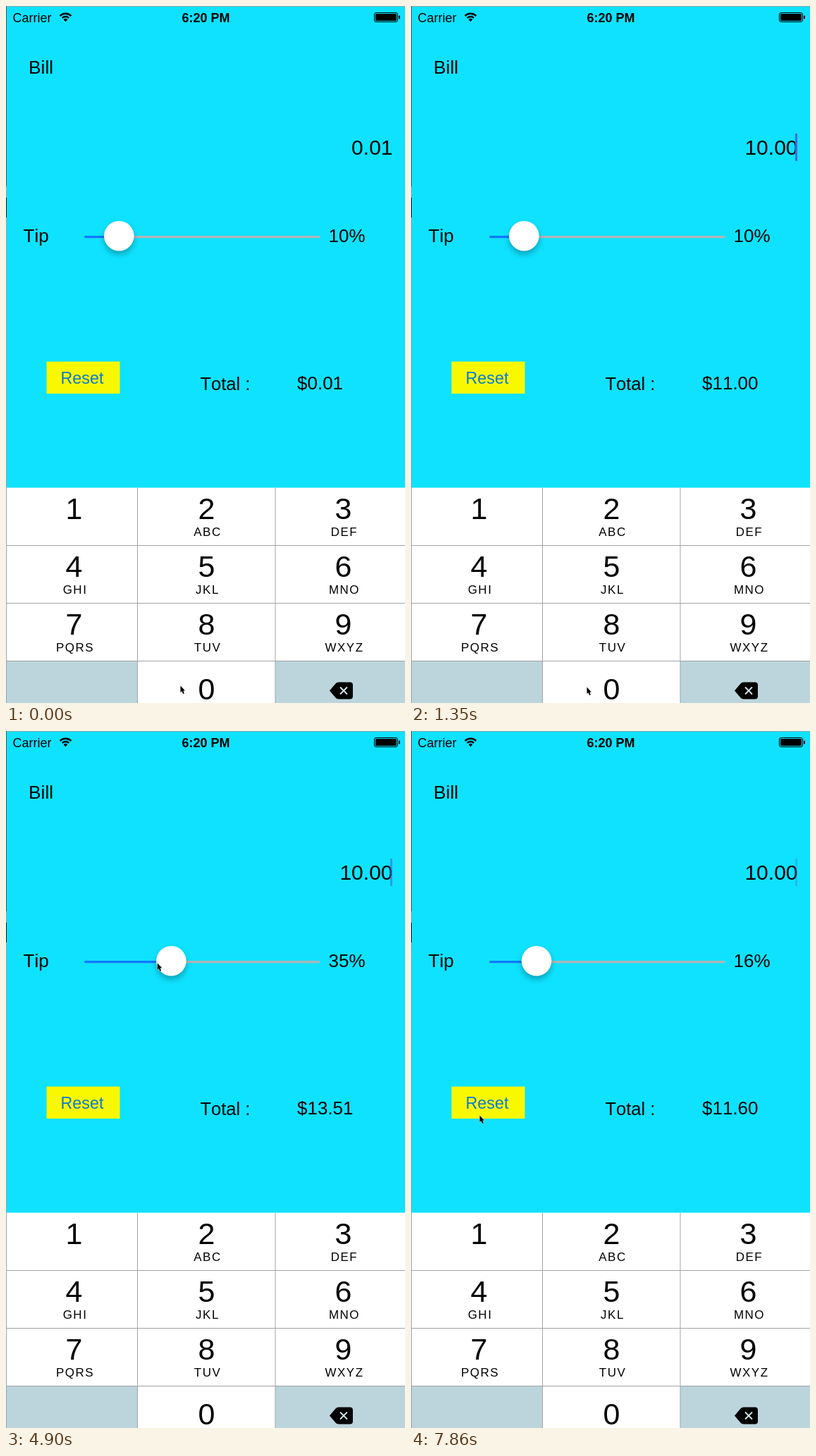
Animation, 566 px wide and 989 px high, one loop 8000 ms. Source, as an HTML page with a canvas:

```html
<!DOCTYPE html>
<html lang="en">
<head>
<meta charset="utf-8">
<title>Tip calculator</title>
<style>
html, body { margin: 0; width: 100%; height: 100%; overflow: hidden; background: #0fe2ff; }
canvas { display: block; width: 566px; height: 989px; }
</style>
</head>
<body>
<canvas id="stage" width="566" height="989"></canvas>
<script>
const ctx = document.getElementById('stage').getContext('2d');
const LOOP = 8000;
const TICK = 148.2;
const SANS = '"Liberation Sans", Arial, sans-serif';
const AQUA = '#0fe2ff', KEY_GREY = '#bcd5dc', LINE_GREY = '#a0a3a5', BLUE = '#0a7aff';
const PRESS_TICKS = [1, 4, 8]; // each press of "0" lasts one tick

// Progress 0..1 that starts fast and settles.
function glide(t, from, to) {
  const u = Math.min(1, Math.max(0, (t - from) / (to - from)));
  return Math.sin(u * Math.PI / 2);
}

const mix = (a, b, u) => a + (b - a) * u;
const thumbX = tip => 130.8 + 2.955 * tip;

function sceneAt(tick) {
  const t = tick * TICK;
  const reach = glide(t, 2390, 3130), leave = glide(t, 6960, 7850);
  const first = glide(t, 3500, 4460), second = glide(t, 4750, 5490), back = glide(t, 5790, 7305);

  const tip = 10 + 22 * first + 10.4 * second - 26.4 * back;
  const gripX = thumbX(tip) - 4 - 21.6 * first + 18.6 * second - 16.9 * back;
  const gripY = 327 + 6 * second - 9 * back;
  const nudge = tick < 3 ? 2 : 0;
  return {
    tip,
    bill: 0.01 * 10 ** PRESS_TICKS.filter(p => p < tick).length,
    pressed: PRESS_TICKS.includes(tick),
    caret: caretAlpha(t),
    pointerX: mix(mix(249 - nudge, gripX, reach), 97, leave),
    pointerY: mix(mix(966 - nudge, gripY, reach), 545, leave)
  };
}

// Solid while typing, then blinking with soft edges.
function caretAlpha(t) {
  if (t < TICK) return 0;
  if (t < 1870) return 1;
  const phase = (t - 1120) % 980;
  const fadeIn = Math.min(1, Math.max(0, (phase - 200) / 100));
  const fadeOut = Math.min(1, Math.max(0, (phase - 750) / 130));
  return fadeIn * (1 - fadeOut ** 2);
}

function rect(x, y, w, h, color) {
  ctx.fillStyle = color;
  ctx.fillRect(x, y, w, h);
}

function pill(x, y, w, h, r, color) {
  ctx.beginPath();
  ctx.roundRect(x, y, w, h, r);
  ctx.fillStyle = color;
  ctx.fill();
}

function text(str, x, y, size, { align = 'left', color = '#000', weight = '', spacing = 0 } = {}) {
  ctx.font = `${weight} ${size}px ${SANS}`;
  ctx.fontKerning = 'none';
  ctx.textAlign = align;
  ctx.letterSpacing = spacing + 'px';
  ctx.fillStyle = color;
  ctx.fillText(str, x, y);
}

function drawStatusBar() {
  text('Carrier', 9.5, 22.5, 18);
  text('6:20 PM', 283.5, 22.5, 18, { align: 'center', weight: 'bold' });

  ctx.strokeStyle = '#000';
  ctx.lineWidth = 2.4;
  for (const r of [6.5, 10.8]) {
    ctx.beginPath();
    ctx.arc(84.5, 21.5, r, -Math.PI * 0.76, -Math.PI * 0.24);
    ctx.stroke();
  }
  ctx.beginPath();
  ctx.moveTo(84.5, 22.5);
  ctx.arc(84.5, 21.5, 3.6, -Math.PI * 0.78, -Math.PI * 0.22);
  ctx.fill();

  ctx.lineWidth = 1;
  ctx.beginPath();
  ctx.roundRect(522.5, 9.5, 33, 13, 2.5);
  ctx.stroke();
  pill(524, 11, 30, 10, 1.2, '#000');
  pill(557, 13.5, 2, 5, 1, '#000');
}

function drawSlider(tip) {
  const x = thumbX(tip);
  pill(111, 326, 334.5, 3.2, 1.6, '#b2b4b6');
  pill(111, 326, x - 111, 3.2, 1.6, BLUE);

  ctx.save();
  ctx.shadowColor = 'rgba(0, 0, 0, 0.28)';
  ctx.shadowBlur = 9;
  ctx.shadowOffsetY = 5;
  ctx.beginPath();
  ctx.arc(x, 326.2, 21.3, 0, Math.PI * 2);
  ctx.fillStyle = '#fff';
  ctx.fill();
  ctx.restore();
}

function drawBackspace() {
  ctx.beginPath();
  ctx.moveTo(459, 971.5);
  ctx.lineTo(467.5, 961.5);
  ctx.quadraticCurveTo(469, 959.5, 472, 959.5);
  ctx.arcTo(492, 959.5, 492, 971, 4);
  ctx.arcTo(492, 983.5, 472, 983.5, 4);
  ctx.lineTo(472, 983.5);
  ctx.quadraticCurveTo(469, 983.5, 467.5, 981.5);
  ctx.closePath();
  ctx.fillStyle = '#000';
  ctx.fill();

  ctx.strokeStyle = '#d5e8ed';
  ctx.lineWidth = 1.8;
  ctx.beginPath();
  for (const d of [-5, 5]) {
    ctx.moveTo(479 - d, 966.5);
    ctx.lineTo(479 + d, 976.5);
  }
  ctx.stroke();
}

function drawKeypad(pressed) {
  rect(0, 683.5, 566, 306, '#fff');
  rect(0, 929, 186, 60, KEY_GREY);
  rect(382, 929, 184, 60, KEY_GREY);
  if (pressed) rect(187, 930, 195, 59, KEY_GREY);
  for (const y of [765, 847, 929]) rect(0, y, 566, 1, LINE_GREY);
  for (const x of [186, 381.5]) rect(x, 683.5, 1, 306, LINE_GREY);

  const centers = [96.5, 284.5, 478.5];
  ['', 'ABC', 'DEF', 'GHI', 'JKL', 'MNO', 'PQRS', 'TUV', 'WXYZ'].forEach((label, i) => {
    const x = centers[i % 3], y = Math.floor(i / 3) * 81.75;
    text(i + 1, x, 728 + y, 43, { align: 'center' });
    text(label, x + 1.5, 752 + y, 17, { align: 'center', spacing: 1.5 });
  });
  text('0', centers[1], 984, 43, { align: 'center' });
  drawBackspace();
}

function drawPointer(x, y) {
  ctx.save();
  ctx.translate(x, y);
  const arrow = new Path2D('M.5 .5V10l2-1.8 1.6 3.8 1.8-.8-1.5-3.6 2.6-.2Z');
  ctx.strokeStyle = 'rgba(255, 255, 255, 0.85)';
  ctx.lineWidth = 0.9;
  ctx.stroke(arrow);
  ctx.fillStyle = '#000';
  ctx.fill(arrow);
  ctx.restore();
}

function drawEdges() {
  rect(0, 0, 566, 1, '#8fa9ae');
  rect(0, 0, 1, 989, '#93a5aa');
  rect(0, 0, 1, 256, '#4f5a5e');
  rect(0, 272, 1, 28, '#101416');
}

function draw({ tip, bill, pressed, caret, pointerX, pointerY }) {
  const total = bill * (1 + Math.round(tip * 10) / 1000);

  rect(0, 0, 566, 989, AQUA);
  drawStatusBar();
  text('Bill', 32, 96, 26.3);
  text(bill.toFixed(2), 548.5, 211, 30, { align: 'right' });
  ctx.globalAlpha = caret;
  rect(545, 181, 3, 39, '#4169e8');
  ctx.globalAlpha = 1;

  text('Tip', 24.5, 335, 26);
  text(Math.round(tip) + '%', 457.5, 335, 26);
  drawSlider(tip);

  rect(57.5, 504.5, 104, 45.5, '#faf800');
  text('Reset', 77.5, 536, 23.3, { color: '#0a7cd4' });
  text('Total :', 275.5, 545, 25.5);
  text('$' + total.toFixed(2), 413, 543.5, 26);

  drawKeypad(pressed);
  drawEdges();
  drawPointer(pointerX, pointerY);
}

function frame() {
  draw(sceneAt(Math.floor(performance.now() % LOOP / TICK)));
  requestAnimationFrame(frame);
}
frame();
</script>
</body>
</html>
```
